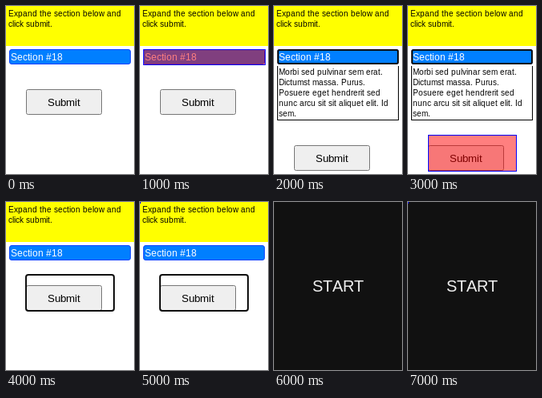
Animation, 160 px wide and 210 px high, one loop 8000 ms. Source, as an HTML page:

```html
<!DOCTYPE html>
<html lang="en">
<head>
<meta charset="utf-8">
<title>Expand and submit</title>
<style>
  html, body { margin: 0; width: 100%; height: 100%; overflow: hidden; background: #fff; }
  body { font: 10px "Liberation Sans", Arial, sans-serif; color: #000; }
  div, svg, button { position: absolute; box-sizing: border-box; }
  svg { left: 0; top: 0; width: 1px; height: 1px; overflow: visible; fill: currentColor; }
  [hidden] { display: none; }
  #query { left: 0; top: 0; width: 160px; height: 50px; background: #ff0; }
  #header {
    left: 4px; top: 54px; width: 152px; height: 19px;
    border: 1px solid #003eff; border-radius: 3px; background: #007fff;
    color: #fff; font-size: 12px;
  }
  #panel {
    left: 4px; top: 75px; width: 152px; height: 68px;
    border: solid #000; border-width: 0 1px 1px;
  }
  #submit { left: 25px; top: 104px; width: 95px; height: 32px; font-size: 13.333px; }
  button { left: 0; top: 0; width: 100%; height: 100%; pointer-events: none; }
  .ring { border: 2px solid #101010; }
  #headerRing { left: 4px; top: 54px; width: 152px; height: 19px; border-radius: 3px; }
  #buttonRing { left: 24px; top: 90px; width: 112px; height: 47px; border-radius: 4px; }
  #mark { border: 1px solid #00f; background: rgba(255, 0, 0, .5); background-clip: padding-box; }
  #cover { left: 0; top: 0; width: 160px; height: 210px; background: #111; color: #eee; font-size: 20px; }
  #dot { left: 0; top: 0; width: 1px; height: 2px; background: #00f; }
</style>
</head>
<body>
<div id="query"><svg>
  <text x="3" y="13">Expand the section below and</text>
  <text x="3" y="26">click submit.</text>
</svg></div>
<div id="header"><svg><text x="1" y="13">Section #18</text></svg></div>
<div id="headerRing" class="ring"></div>
<div id="panel"><svg>
  <text x="1" y="11">Morbi sed pulvinar sem erat.</text>
  <text x="1" y="24">Dictumst massa. Purus.</text>
  <text x="1" y="37">Posuere eget hendrerit sed</text>
  <text x="1" y="50">nunc arcu sit sit aliquet elit. Id</text>
  <text x="1" y="63">sem.</text>
</svg></div>
<div id="submit"><button tabindex="-1"></button><svg><text x="27" y="21">Submit</text></svg></div>
<div id="buttonRing" class="ring"></div>
<div id="mark"></div>
<div id="cover"><svg><text x="48" y="112">START</text></svg></div>
<div id="dot"></div>
<script>
const $ = id => document.getElementById(id);
const show = (id, on) => { $(id).hidden = !on; };

function place(id, x, y, w, h) {
  Object.assign($(id).style, { left: x + 'px', top: y + 'px', width: w + 'px', height: h + 'px' });
}

// Snap every letter to whole pixels, as hinted text does.
const ctx = document.createElement('canvas').getContext('2d');
for (const text of document.querySelectorAll('text')) {
  const { fontSize, fontFamily } = getComputedStyle(text);
  ctx.font = `${fontSize} ${fontFamily}`;
  let x = +text.getAttribute('x');
  const starts = [...text.textContent].map(letter => {
    const start = x;
    x += Math.round(ctx.measureText(letter).width);
    return start;
  });
  text.setAttribute('x', starts.join(' '));
}

function draw() {
  const step = Math.floor(performance.now() % 8000 / 1000);
  const open = step === 2 || step === 3;
  show('panel', open);
  show('headerRing', open);
  $('submit').style.top = (open ? 174 : 104) + 'px';
  show('buttonRing', step === 4 || step === 5);
  show('mark', step === 1 || step === 3);
  if (step === 1) place('mark', 4, 54, 153, 20);
  if (step === 3) place('mark', 25, 161, 111, 46);
  show('cover', step >= 6);
  show('dot', step === 5 || step === 7);
  requestAnimationFrame(draw);
}
draw();
</script>
</body>
</html>
```
